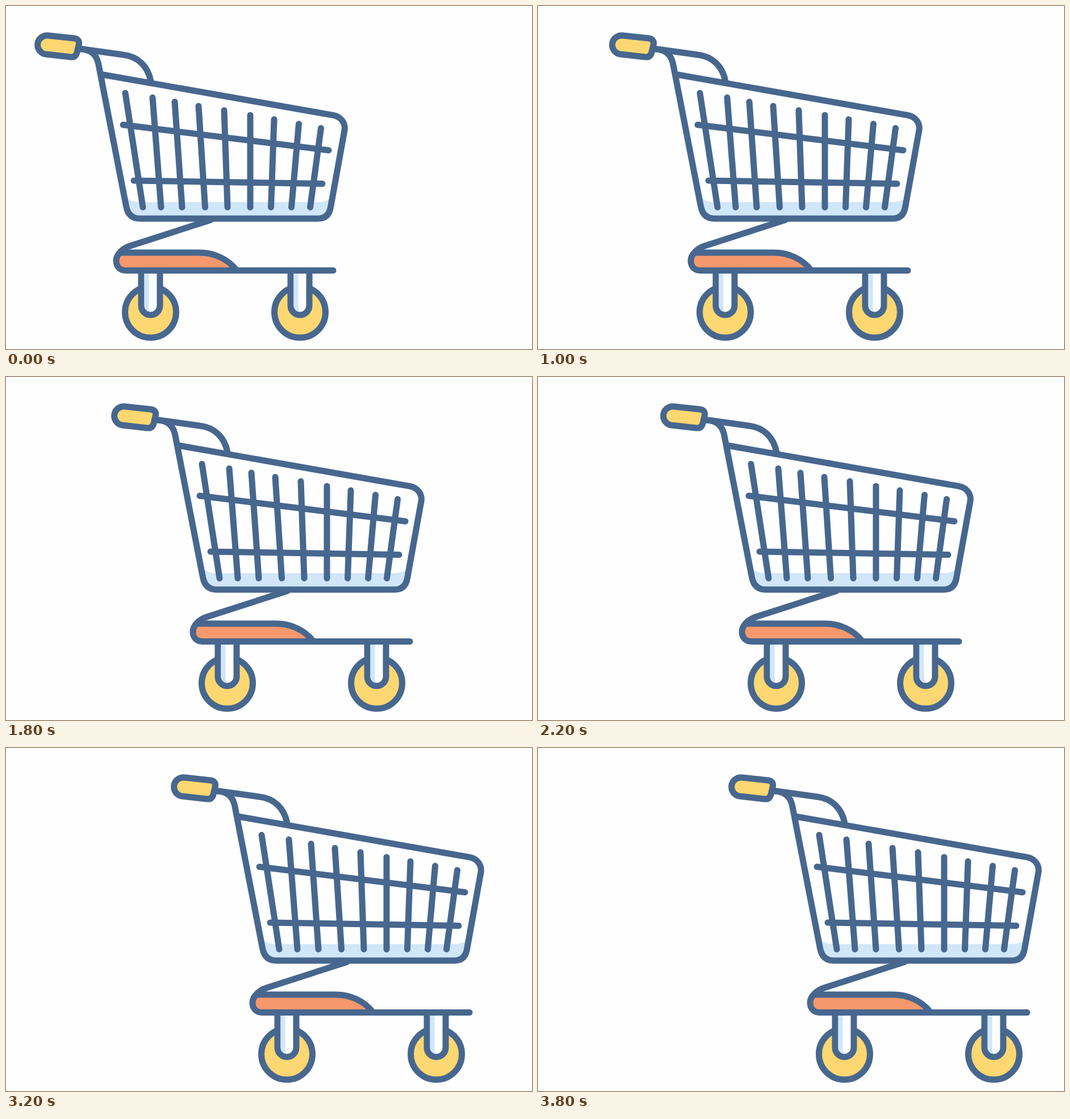
These frames come from a looping animation (926 px wide and 605 px high, 4000 ms). An HTML page:

```html
<!DOCTYPE html>
<html lang="en">
<head>
<meta charset="utf-8">
<title>Rolling cart</title>
<style>
  html, body { margin: 0; width: 100%; height: 100%; overflow: hidden; background: #fefefe; }
  svg { display: block; width: 926px; height: 605px; }
  #cart { fill: none; stroke: #47678e; stroke-width: 11; stroke-linejoin: round; }
  .round { stroke-linecap: round; }
  .yellow { fill: #fdd771; }
  .orange { fill: #f6986c; stroke: none; }
  .blue { fill: #d0e6f9; stroke: none; }
  .white { fill: #fefefe; }
</style>
</head>
<body>
<svg viewBox="0 0 926 605">
  <defs>
    <g id="wheel">
      <circle class="yellow" cx="254.5" cy="540" r="45"/>
      <path class="white" d="M238 467V528.5A16.5 16.5 0 0 0 271 528.5V467"/>
      <path class="blue" d="M243.5 470H251.5V528Q251.5 536 254 539.5A11 11 0 0 1 243.5 528.5Z"/>
    </g>
  </defs>
  <g id="cart">
    <!-- chassis -->
    <use href="#wheel"/>
    <use href="#wheel" x="263"/>
    <path class="orange" d="M194 449C194 441 200 435 208 435H340C366 435 390 446 404 465H211C201 465 194 459 194 449Z"/>
    <path d="M203 435H340C366 435 390 446 405 465"/>
    <path class="round" d="M360 377.5L219 423C206 427 194 438 194 449C194 460 201 466.5 211 466.5H576"/>
    <!-- basket -->
    <path class="blue" d="M209 334Q217 346 236 346H548Q567 346 575 335L571 356Q567 375 549 375H234Q215 375 212 355Z"/>
    <path d="M131 75.5L206 86C232 89 250 106 255 133"/>
    <path d="M131 76C150 77 159 86 162.5 101L211.5 353Q215.5 375 236 375H549Q568 375 571.5 355L596 219C598 206 589 195 576 192.7L167 120.5"/>
    <g id="bars" class="round"></g>
    <!-- handle -->
    <path class="yellow" d="M73.5 52L120 57Q129.5 58.5 128.5 67L125 82Q122.5 91 114 90L70 85A16.6 16.6 0 0 1 73.5 52Z"/>
  </g>
</svg>
<script>
  // Upright bars: top x, top y, bottom x
  const uprights = [
    [210, 153.5, 241], [258, 161.5, 273], [297, 169, 310],
    [339, 176.5, 350.5], [384, 184, 390], [430, 192.5, 430],
    [472, 200, 466.5], [515.5, 208, 502.5], [554.5, 215.5, 535.5]
  ];
  const rails = [[206, 209.5, 568, 254.5], [225, 308, 557, 313.5]];
  const lines = [...uprights.map(([x, y, foot]) => [x, y, foot, 355]), ...rails];

  for (const [x1, y1, x2, y2] of lines) {
    const bar = document.createElementNS('http://www.w3.org/2000/svg', 'path');
    bar.setAttribute('d', `M${x1} ${y1}L${x2} ${y2}`);
    document.getElementById('bars').append(bar);
  }

  // 15 px hop every 200 ms
  document.getElementById('cart').animate(
    { transform: ['translateX(0px)', 'translateX(300px)'] },
    { duration: 4000, iterations: Infinity, easing: 'steps(20, end)' }
  );
</script>
</body>
</html>
```
